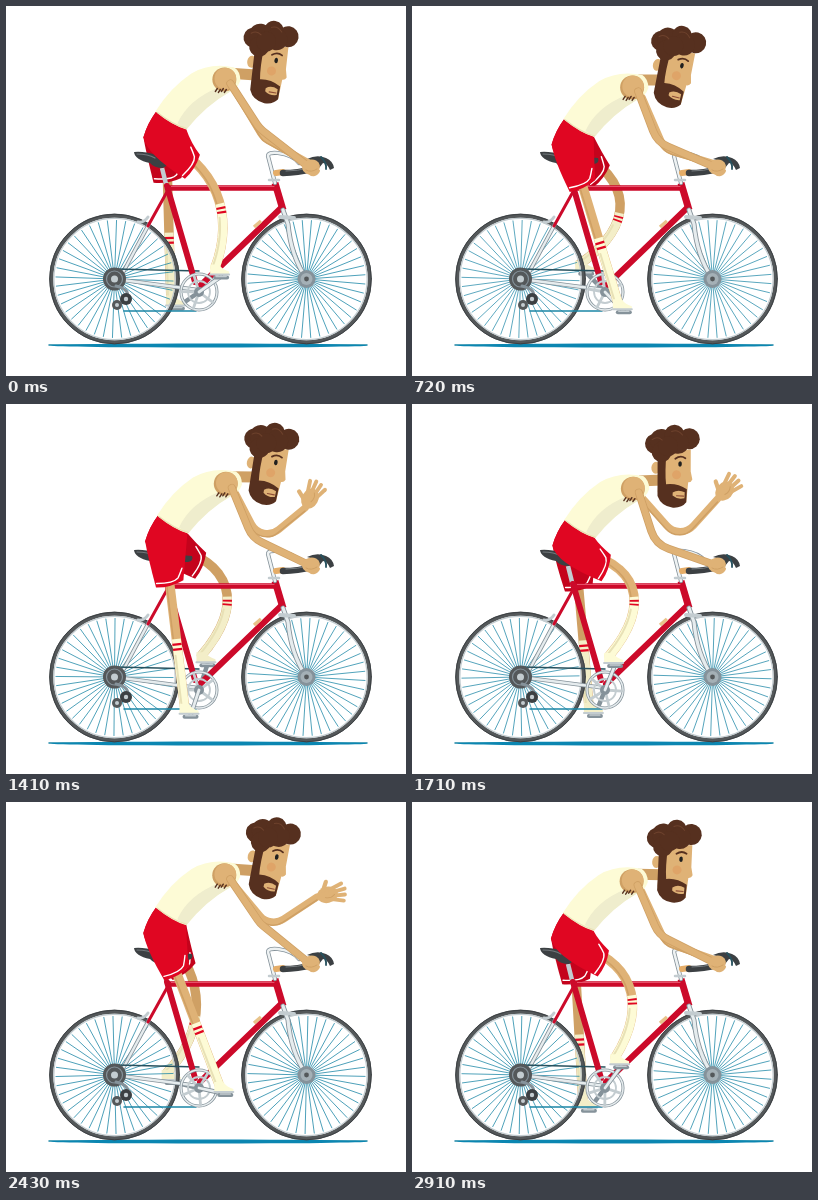
These frames come from a looping animation (400 px wide and 370 px high, 2.94 s). An HTML page with a canvas:

```html
<!DOCTYPE html>
<html lang="en">
<head>
<meta charset="utf-8">
<title>Cyclist</title>
<style>
html, body { margin: 0; width: 100%; height: 100%; overflow: hidden; background: #fff; }
canvas { display: block; width: 400px; height: 370px; }
</style>
</head>
<body>
<canvas id="stage" width="400" height="370"></canvas>
<script>
const ctx = document.getElementById('stage').getContext('2d');
const LOOP = 2940, STEP = 30, TURNS = 5, TAU = Math.PI * 2, RAD = Math.PI / 180;
const C = {
  skin: '#dfb276', skinFar: '#cfa064', cream: '#fdfbd6', creamFar: '#f3eec8',
  red: '#e00622', redFar: '#c4031c', frame: '#cc0a2a', hair: '#56301f',
  dark: '#3c4043', tire: '#54585a', silver: '#c3ccd0', steel: '#85929a',
  light: '#e6ecee', teal: '#1b86a6', white: '#fff'
};
const HUB_R = [108.5, 273], HUB_F = [300.5, 273], BB = [193, 286], CRANK = 27;
const GRIP = [303, 161];

const add = (p, x, y) => [p[0] + x, p[1] + y];
const lerp = (a, b, k) => a + (b - a) * k;
const mix = (p, q, k) => [lerp(p[0], q[0], k), lerp(p[1], q[1], k)];

function pen(width, color, cap = 'round') {
  ctx.lineWidth = width;
  ctx.strokeStyle = color;
  ctx.lineCap = cap;
  ctx.lineJoin = 'round';
  ctx.stroke();
}
function line(pts, width, color, cap) {
  ctx.beginPath();
  pts.forEach(p => ctx.lineTo(...p));
  pen(width, color, cap);
}
function disc(x, y, r, color, ry = r, turn = 0) {
  ctx.beginPath();
  ctx.ellipse(x, y, r, ry, turn, 0, TAU);
  ctx.fillStyle = color;
  ctx.fill();
}
function ring(x, y, r, width, color) {
  ctx.beginPath();
  ctx.arc(x, y, r, 0, TAU);
  pen(width, color);
}
function shape(d, color) {
  ctx.fillStyle = color;
  ctx.fill(new Path2D(d));
}
function curve(d, width, color) {
  ctx.lineWidth = width;
  ctx.strokeStyle = color;
  ctx.lineCap = ctx.lineJoin = 'round';
  ctx.stroke(new Path2D(d));
}

// Middle joint of a two-part limb; side chooses the way it bends.
function joint(a, b, la, lb, side) {
  const dx = b[0] - a[0], dy = b[1] - a[1], d = Math.hypot(dx, dy);
  if (d >= la + lb) return mix(a, b, la / (la + lb));
  const m = (la * la - lb * lb + d * d) / (2 * d);
  const off = Math.sqrt(la * la - m * m) * side;
  return [a[0] + (dx * m + dy * off) / d, a[1] + (dy * m - dx * off) / d];
}
function limb(a, k, b, r, width, color) {
  ctx.beginPath();
  ctx.moveTo(...a);
  ctx.arcTo(...k, ...b, r);
  ctx.lineTo(...b);
  pen(width, color);
}

// Boneless leg: a cubic bulging at the knee, returned as a function of 0..1.
function noodle(a, k, b) {
  const bulge = mix(mix(a, b, 0.5), k, 1.9);
  const c = mix(a, bulge, 0.6), d = mix(b, bulge, 0.6);
  return u => {
    const ac = mix(a, c, u), cd = mix(c, d, u), db = mix(d, b, u);
    return mix(mix(ac, cd, u), mix(cd, db, u), u);
  };
}
function span(f, from, to, n = 16) {
  return Array.from({ length: n + 1 }, (_, i) => f(lerp(from, to, i / n)));
}

// Body drop: two dips per turn, the far-leg dip being deeper.
function drop(th) {
  return 7.5 - 8 * Math.cos(2 * (th - 162 * RAD)) - 4 * Math.cos(th - 62 * RAD);
}
// The head nods forward once per turn.
function nod(th) {
  return (7 + 7 * Math.tanh(1.8 * Math.cos(th - 45 * RAD))) * RAD;
}

// Wave of the far arm: time, wrist x, wrist y, hand angle.
const WAVE = [
  [1080, 306, 159, 20], [1410, 299, 104, -62], [1610, 310, 90, -36], [1810, 301, 100, -60],
  [2010, 312, 82, -48], [2220, 302, 97, -56], [2430, 311, 95, -12], [2700, 306, 159, 20]
];
function waveAt(t) {
  const i = WAVE.findIndex(k => k[0] > t);
  if (i < 1) return null;
  const a = WAVE[i - 1], b = WAVE[i];
  const k = (t - a[0]) / (b[0] - a[0]), e = k * k * (3 - 2 * k);
  return a.map((v, j) => lerp(v, b[j], e));
}

function wheel([x, y], turn) {
  ctx.save();
  ctx.translate(x, y);
  ring(0, 0, 63.2, 4, C.tire);
  ring(0, 0, 64.8, 1, C.dark);
  ring(0, 0, 60.6, 1.2, C.silver);
  ctx.rotate(turn);
  ctx.beginPath();
  for (let i = 0; i < 40; i++) {
    const a = i * TAU / 40, cos = Math.cos(a), sin = Math.sin(a);
    ctx.moveTo(8 * cos, 8 * sin);
    ctx.lineTo(59 * cos, 59 * sin);
  }
  pen(0.7, C.teal, 'butt');
  ctx.restore();
}

function pedalAt(th) {
  return add(BB, CRANK * Math.cos(th), CRANK * Math.sin(th));
}
function crank(th, color) {
  const p = pedalAt(th);
  line([BB, p], 4.5, C.steel);
  line([BB, p], 2.8, color);
  line([add(p, -6, 1), add(p, 6, 1)], 4, C.steel);
  line([add(p, -5, 0), add(p, 5, 0)], 1.5, C.silver);
}

function leg(th, h, far) {
  const skin = far ? C.skinFar : C.skin, sock = far ? C.creamFar : C.cream;
  const hip = [(far ? 160 : 157) + 0.3 * h, 135 + h];
  const ankle = add(pedalAt(th), -6, -9);
  const knee = joint(hip, ankle, 75, 77, 1);
  const f = noodle(hip, knee, ankle);
  line(span(f, 0, 1), 9.5, skin);
  if (!far) line(span(f, 0, 0.62).map(p => add(p, -3, 0.5)), 1.5, C.skinFar);
  line(span(f, 0.58, 1), 9, sock, 'butt');
  line(span(f, 0.68, 1).map(p => add(p, -2.8, 0)), 2, '#e8e1b6');
  [0.605, 0.635].forEach(u => line(span(f, u, u + 0.014, 2), 9.2, C.red, 'butt'));

  // Shoe
  ctx.beginPath();
  ctx.moveTo(...add(ankle, -5, -3));
  ctx.lineTo(...add(ankle, 4, -3));
  ctx.quadraticCurveTo(...add(ankle, 7, 2), ...add(ankle, 14, 4));
  ctx.lineTo(...add(ankle, 14, 7));
  ctx.lineTo(...add(ankle, -5, 7));
  ctx.closePath();
  ctx.fillStyle = sock;
  ctx.fill();
  line([add(ankle, -5, 7), add(ankle, 14, 7)], 2, C.silver);

  // Shorts
  const len = Math.hypot(knee[0] - hip[0], knee[1] - hip[1]);
  const d = [(knee[0] - hip[0]) / len, (knee[1] - hip[1]) / len];
  const spot = (n, s) => add(hip, d[0] * n + d[1] * s, d[1] * n - d[0] * s);
  const waist = [[150 + 0.3 * h, 104 + h], [180 + 0.2 * h, 122 + h]];
  ctx.beginPath();
  ctx.moveTo(...waist[0]);
  ctx.quadraticCurveTo(141 + 0.3 * h, 116 + h, 137 + 0.3 * h, 130 + h);
  ctx.quadraticCurveTo(140 + 0.3 * h, 147 + h, ...spot(40, -14));
  ctx.quadraticCurveTo(...spot(42, 0), ...spot(36, 14));
  ctx.quadraticCurveTo(...spot(22, 17), ...waist[1]);
  ctx.closePath();
  ctx.fillStyle = far ? C.redFar : C.red;
  ctx.fill();
  ctx.beginPath();
  ctx.moveTo(...spot(36, -13));
  ctx.quadraticCurveTo(...spot(38, 4), ...spot(33, 9));
  ctx.quadraticCurveTo(...spot(30, 11), ...spot(24, 14));
  pen(1.4, C.white);
}

function farArm(t, h) {
  const s = [228 + 0.25 * h, 82 + 1.1 * h], w = waveAt(t);
  const wrist = w ? [w[1], w[2]] : [306, 159];
  const elbow = joint(s, wrist, 56, 56, -1);
  limb(s, elbow, wrist, 18, 7.2, C.skin);
  limb(add(s, -1, 3), add(elbow, -1, 3), add(wrist, 0, 3), 18, 1.5, C.skinFar);
  if (!w) return;
  const open = Math.min(1, (159 - w[2]) / 40);
  ctx.save();
  ctx.translate(...wrist);
  ctx.rotate(w[3] * RAD);
  ctx.scale(1.18, 1.18);
  disc(9, 0, 9, C.skin, 7);
  for (let i = 0; i < 4; i++) {
    const y = -5 + i * 3.5, tip = lerp(16, 25 - Math.abs(i - 1.3) * 2, open);
    line([[12, y * 0.8], [tip, y * 1.4]], 3.3, C.skin);
  }
  line([[6, -4], [10, -6 - 5 * open]], 3.6, C.skin);
  curve('M7 2Q11 4 15 1', 0.8, C.skinFar);
  ctx.restore();
}

function bike(th) {
  wheel(HUB_R, th * 2);
  wheel(HUB_F, th * 2 + 0.05);

  // Rear triangle and chain
  [[4, C.steel], [2.4, C.light]].forEach(([w, c]) => {
    line([HUB_R, add(BB, 0, -2)], w, c);
    line([add(HUB_R, 5, 0), [143, 218]], w, c);
  });
  line([[142, 220], [162, 184]], 3, C.frame);
  curve('M132 216Q138 217 142 211', 3, C.silver);
  line([[110, 263], [193, 265]], 1.5, '#27515e');
  line([[118, 305], [190, 305]], 1.5, C.teal);
  disc(...HUB_R, 11.5, C.tire);
  ring(...HUB_R, 8, 1.2, C.steel);
  disc(...HUB_R, 3.5, C.silver);
  curve('M110 280Q126 284 120 293L111 299', 3, C.steel);
  disc(120, 293, 6, C.dark);
  disc(120, 293, 2.2, C.silver);
  disc(111, 299, 5, C.tire);
  disc(111, 299, 2, C.silver);

  // Main tubes
  line([[156, 162], [161, 182]], 4.5, C.silver, 'butt');
  line([[161, 180], [189, 276]], 6, C.frame);
  line([[162, 182], [270, 182]], 5.5, C.frame);
  line([[275, 202], [194, 280]], 6, C.frame);
  line([[269, 177], [277, 204]], 7, C.frame, 'butt');
  line([[165, 180.5], [268, 180.5]], 1, '#e75069');
  line([[248, 221], [255, 215]], 3.5, '#e8c38a', 'butt');

  // Fork and stem
  const fork = 'M277 204L282 218Q285 250 300 272';
  const stem = 'M269 177L262 150Q262 146 272 147Q287 149 293 157';
  curve(fork, 5, C.steel);
  curve(fork, 3.2, C.light);
  curve('M274 211L288 212', 4, C.silver);
  disc(...HUB_F, 9, C.steel);
  disc(...HUB_F, 6, '#a4b0b6');
  disc(...HUB_F, 2.4, C.tire);
  curve(stem, 4.2, C.steel);
  curve(stem, 2.6, '#eef2f3');
  line([[263, 174], [273, 174]], 2.5, C.silver);

  // Chainring
  ring(...BB, 18, 3, C.steel);
  ring(...BB, 18, 1.5, C.light);
  ring(...BB, 11, 1.8, C.silver);
  for (let i = 0; i < 5; i++) {
    const a = th + i * TAU / 5;
    line([BB, add(BB, 17 * Math.cos(a), 17 * Math.sin(a))], 2.8, C.silver);
  }
  disc(...BB, 5, C.steel);

  // Saddle
  shape('M128 146Q138 145 150 149L186 152Q188 157 182 158L163 158L157 162Q148 162 144 157Q129 154 128 146Z', C.dark);
  curve('M131 148Q142 148 149 152', 1.2, '#72787c');
}

function bars() {
  curve('M270 167L277 166', 6, '#e5ad68');
  curve('M277 167Q292 167 306 163', 6.5, C.dark);
  curve('M280 165Q292 165 302 162', 1, '#777d80');
  shape('M301 153Q311 148 320 152Q327 155 328 162L324 164Q321 157 317 157L313 162Q309 154 301 153Z', C.dark);
  curve('M315 151Q321 157 320 163', 1.8, '#27515e');
}

function torso(h) {
  ctx.save();
  ctx.translate(0.28 * h, 1.05 * h);
  shape('M149 104Q164 80 185 66Q204 55 228 60Q234 64 234 73Q231 82 222 85Q199 98 180 122Q166 118 149 104Z', C.cream);
  shape('M171 116Q182 92 212 80L224 84Q199 98 180 122Z', '#efedcd');
  curve('M151 105Q166 117 180 121', 1.2, '#e8e1b6');
  ctx.restore();
}

function nearArm(h) {
  const s = [218 + 0.25 * h, 72 + 1.1 * h];
  const elbow = joint(s, GRIP, 60, 63, -1);
  disc(...s, 12, C.skinFar);
  disc(s[0] + 1, s[1] - 1, 10.8, C.skin);
  for (let i = 0; i < 4; i++) {
    line([add(s, -7 + i * 3, 9 + i % 2), add(s, -9 + i * 3, 12 + i % 2)], 1.4, C.hair);
  }
  const from = add(s, 6, 4);
  limb(from, elbow, GRIP, 28, 8, C.skinFar);
  limb(from, elbow, GRIP, 28, 6.4, C.skin);
  disc(305, 161, 9, C.skin, 7.5, -0.2);
  curve('M303 166Q308 171 312 165', 4, C.skin);
  curve('M300 164Q305 167 311 163', 0.9, C.skinFar);
}

function head(h, tilt) {
  const k = 1 - h / 17;
  line([[224 + 0.28 * h, 66 + 0.95 * h], [250, 80 - 12 * k]], 11, C.skinFar, 'butt');
  ctx.save();
  ctx.translate(260 + 2 * k, 72 - 10.5 * k);
  ctx.rotate(tilt);
  ctx.translate(-260, -72);
  disc(243, 68, 4.5, C.skin, 6);
  shape('M246 50L277 48L278 70L280 78Q279 81 276 81L275 101L260 106L246 92Z', C.skin);
  disc(264, 74, 4.5, '#dfa468');
  shape('M244 52L253 52Q252 72 254 84Q265 82 275 88L275 101Q271 107 262 107Q250 106 246 96Z', C.hair);
  shape('M261 92Q266 88 273 91L273 97Q266 99 261 95Z', C.skin);
  curve('M265 95L272 95', 1.1, '#8d4d36');
  disc(267, 63, 1.8, '#20201f', 2.8);
  curve('M262 58Q267 54 272 57', 1.8, C.hair);
  [[241, 44, 10], [247, 40, 11], [260, 34, 10], [275, 37.5, 10.5],
   [264, 42, 11], [248, 52, 10], [254, 46, 10]].forEach(b => disc(...b, C.hair));
  curve('M238 40Q243 36 248 40M257 31Q263 28 268 34', 1, '#6d412c');
  ctx.restore();
}

function shadow() {
  line([[43, 339], [361, 339]], 1.5, C.teal);
  disc(203, 339.5, 158, '#0b86b1', 2);
}

function draw(t) {
  const th = t / LOOP * TURNS * TAU - 35 * RAD, h = drop(th);
  ctx.fillStyle = C.white;
  ctx.fillRect(0, 0, 400, 370);
  shadow();
  crank(th + Math.PI, C.steel);
  leg(th + Math.PI, h, true);
  bike(th);
  bars();
  farArm(t, h);
  crank(th, C.light);
  leg(th, h, false);
  head(h, nod(th));
  torso(h);
  nearArm(h);
}

function tick() {
  draw(Math.floor(performance.now() % LOOP / STEP) * STEP);
  requestAnimationFrame(tick);
}
tick();
</script>
</body>
</html>
```
